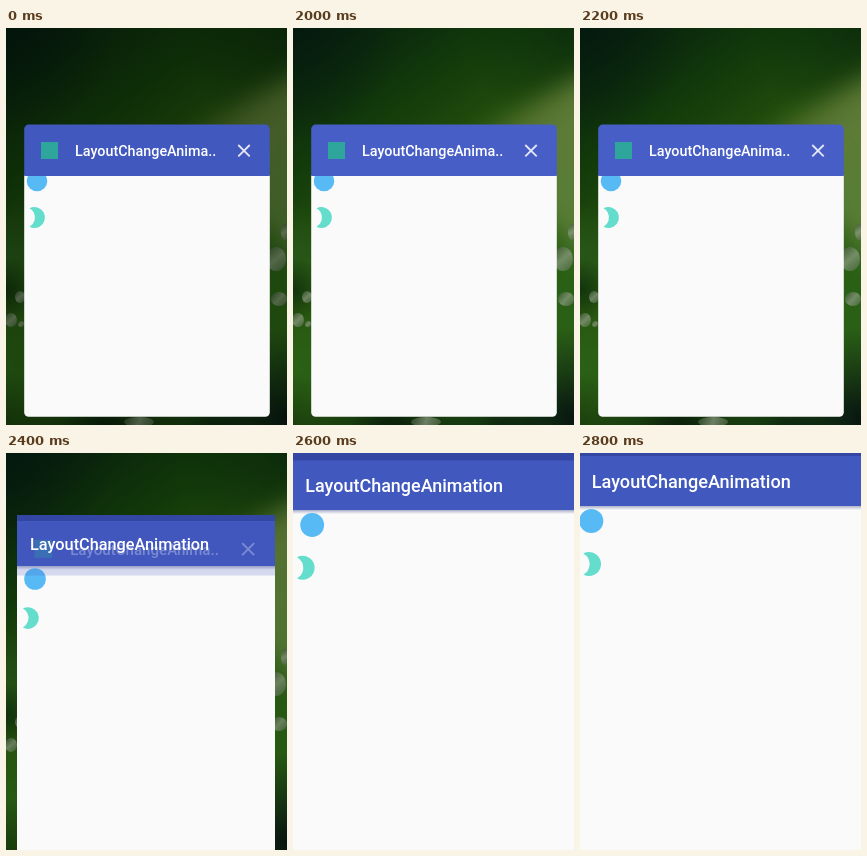
An HTML page with a canvas for the animation above (3500 ms loop, 281 by 397 pixels).

```html
<!DOCTYPE html>
<html lang="en">
<head>
<meta charset="utf-8">
<title>Layout change</title>
<style>
  html, body { margin: 0; width: 100%; height: 100%; overflow: hidden; background: #06190e; }
  canvas { display: block; width: 281px; height: 397px; }
</style>
</head>
<body>
<canvas></canvas>
<script>
const W = 281, H = 397, LOOP = 3500, STEP = 100;
const canvas = document.querySelector('canvas');
const ctx = canvas.getContext('2d');
const ratio = window.devicePixelRatio || 1;
canvas.width = W * ratio;
canvas.height = H * ratio;

const INDIGO = '#4158be', PAPER = '#fafafa', BLUE = '#58baf5', MINT = '#64ddcd';

// Poses of the opening window
const KEYS = [
  { at: 2400, left: 11, right: 269, top: 62, head: 68, scale: 0.9, textX: 24, ball: [29, 126], moon: [22, 165] },
  { at: 2500, left: 0, right: 281, top: 0, head: 13, scale: 0.985, textX: 13, ball: [29, 77], moon: [10.5, 119.5] },
  { at: 2800, left: 0, right: 281, top: 0, head: 3, scale: 1, textX: 11.7, ball: [11.3, 68], moon: [9, 111] }
];

const mix = (a, b, u) => Array.isArray(a) ? a.map((v, i) => mix(v, b[i], u)) : a + (b - a) * u;

function poseAt(t) {
  const [first, mid, last] = KEYS;
  const [a, b] = t < mid.at ? [first, mid] : [mid, last];
  const u = Math.min(1, (t - a.at) / (b.at - a.at));
  const eased = u * (2 - u);
  const pose = {};
  for (const k in a) pose[k] = mix(a[k], b[k], eased);
  return pose;
}

function rect(color, x, y, w, h) {
  ctx.fillStyle = color;
  ctx.fillRect(x, y, w, h);
}

function disc(color, x, y, r) {
  ctx.fillStyle = color;
  ctx.beginPath();
  ctx.arc(x, y, r, 0, 7);
  ctx.fill();
}

function crescent(x, y, r) {
  const gap = r * 0.95, a = Math.acos(gap / 2 / r);
  ctx.fillStyle = MINT;
  ctx.beginPath();
  ctx.arc(x, y, r, a - Math.PI, Math.PI - a);
  ctx.arc(x - gap, y, r, a, -a, true);
  ctx.fill();
}

function label(text, x, y, size) {
  ctx.font = `500 ${size}px Roboto, sans-serif`;
  ctx.fillStyle = '#fff';
  ctx.fillText(text, x, y);
}

function shade(fill, ...stops) {
  stops.forEach(([p, c]) => fill.addColorStop(p, c));
  return fill;
}

function glow(x, y, r, rgb, alpha) {
  const g = ctx.createRadialGradient(x, y, 0, x, y, r);
  rect(shade(g, [0, `rgba(${rgb},${alpha})`], [1, `rgba(${rgb},0)`]), 0, 0, W, H);
}

function drop(x, y, rx, ry) {
  const g = ctx.createLinearGradient(x - rx, y - ry, x + rx, y + ry);
  ctx.fillStyle = shade(g, [0, 'rgba(60,85,50,.7)'], [0.5, 'rgba(150,165,140,.7)'], [1, 'rgba(90,115,80,.6)']);
  ctx.beginPath();
  ctx.ellipse(x, y, rx, ry, 0, 0, 7);
  ctx.fill();
}

function wallpaper(dim) {
  const base = ctx.createLinearGradient(0, 0, 200, 300);
  rect(shade(base, [0, '#061c10'], [0.35, '#143f0a'], [0.6, '#2b5a10'], [1, '#2c6416']), 0, 0, W, H);
  glow(0, 0, 110, '4,26,16', 0.7);
  glow(281, 0, 110, '10,42,12', 0.8);

  // Blurred leaf on the right
  const leaf = ctx.createLinearGradient(190, 60, 281, 150);
  ctx.fillStyle = shade(leaf, [0, '#34580e'], [0.6, '#62803a'], [1, '#5c8238']);
  ctx.filter = `blur(${12 * ratio}px)`;
  ctx.beginPath();
  ctx.moveTo(310, 40);
  ctx.quadraticCurveTo(235, 72, 180, 116);
  ctx.lineTo(310, 250);
  ctx.fill();
  ctx.filter = 'none';

  glow(0, 225, 50, '42,92,30', 0.7);
  glow(0, 262, 32, '12,44,12', 0.8);
  glow(0, 340, 50, '44,104,24', 0.7);
  glow(0, 405, 60, '18,46,10', 0.7);
  glow(100, 405, 90, '6,24,8', 0.95);
  glow(205, 405, 80, '10,36,14', 0.9);
  glow(281, 390, 90, '8,22,18', 1);

  drop(14, 269, 5, 6);
  drop(5, 292, 6, 7);
  drop(15, 296, 3, 3);
  drop(270, 231, 10, 12);
  drop(279, 204, 4, 8);
  drop(273, 271, 8, 7);
  drop(133, 394, 15, 5);
  rect(`rgba(0,8,2,${dim})`, 0, 0, W, H);
}

function cardHead(fill, mark, markAlpha) {
  rect(fill, -1, -1, 247, 52);
  ctx.globalAlpha *= markAlpha;
  rect('#2ea69b', 16.5, 17, 17, 17);
  label('LayoutChangeAnima..', 50.5, 31, 14.35);
  ctx.strokeStyle = mark;
  ctx.lineWidth = 1.8;
  ctx.beginPath();
  ctx.moveTo(213.8, 20);
  ctx.lineTo(225.2, 31.4);
  ctx.moveTo(225.2, 20);
  ctx.lineTo(213.8, 31.4);
  ctx.stroke();
}

function card(fill) {
  ctx.save();
  ctx.translate(18.5, 97);
  ctx.beginPath();
  ctx.roundRect(-0.3, -0.4, 245.6, 292.2, 4.5);
  ctx.clip();
  rect(PAPER, -1, 50, 247, 243);
  disc(BLUE, 12.5, 56, 10.3);
  crescent(10, 92.5, 10.5);
  cardHead(fill, '#e3e7f8', 1);
  ctx.restore();
}

function appWindow(p) {
  const { left, top, head, scale } = p;
  const width = p.right - left, bottom = head + 50 * scale;
  rect(PAPER, left, top, width, H - top);
  rect(INDIGO, left, top, width, bottom - top);
  rect('#3446a3', left, top, width, head - top);
  const edge = ctx.createLinearGradient(0, bottom, 0, bottom + 4);
  rect(shade(edge, [0, 'rgba(60,70,130,.4)'], [1, 'rgba(60,70,130,0)']), left, bottom, width, 4);
  disc(BLUE, ...p.ball, 12 * scale);
  crescent(...p.moon, 12 * scale);
}

function fadingHead() {
  ctx.save();
  ctx.translate(11, 69);
  ctx.scale(1.053, 1.053);
  ctx.beginPath();
  ctx.rect(0, 0, 245, 51);
  ctx.clip();
  ctx.globalAlpha = 0.2;
  cardHead(INDIGO, '#fff', 1.5);
  ctx.restore();
}

function draw(t) {
  ctx.setTransform(ratio, 0, 0, ratio, 0, 0);
  if (t < 2400) {
    const resting = t < 2000;
    wallpaper(resting ? 0.3 : 0.04);
    card(resting ? INDIGO : '#475ec6');
    return;
  }
  const pose = poseAt(t), fading = t < 2500;
  if (fading) wallpaper(0.12);
  appWindow(pose);
  if (fading) fadingHead();
  label('LayoutChangeAnimation', pose.textX, pose.head + 32 * pose.scale, 18.1 * pose.scale);
}

const start = performance.now();
function tick() {
  const t = (performance.now() - start) % LOOP;
  draw(Math.floor(t / STEP) * STEP);
  requestAnimationFrame(tick);
}
tick();
</script>
</body>
</html>
```
